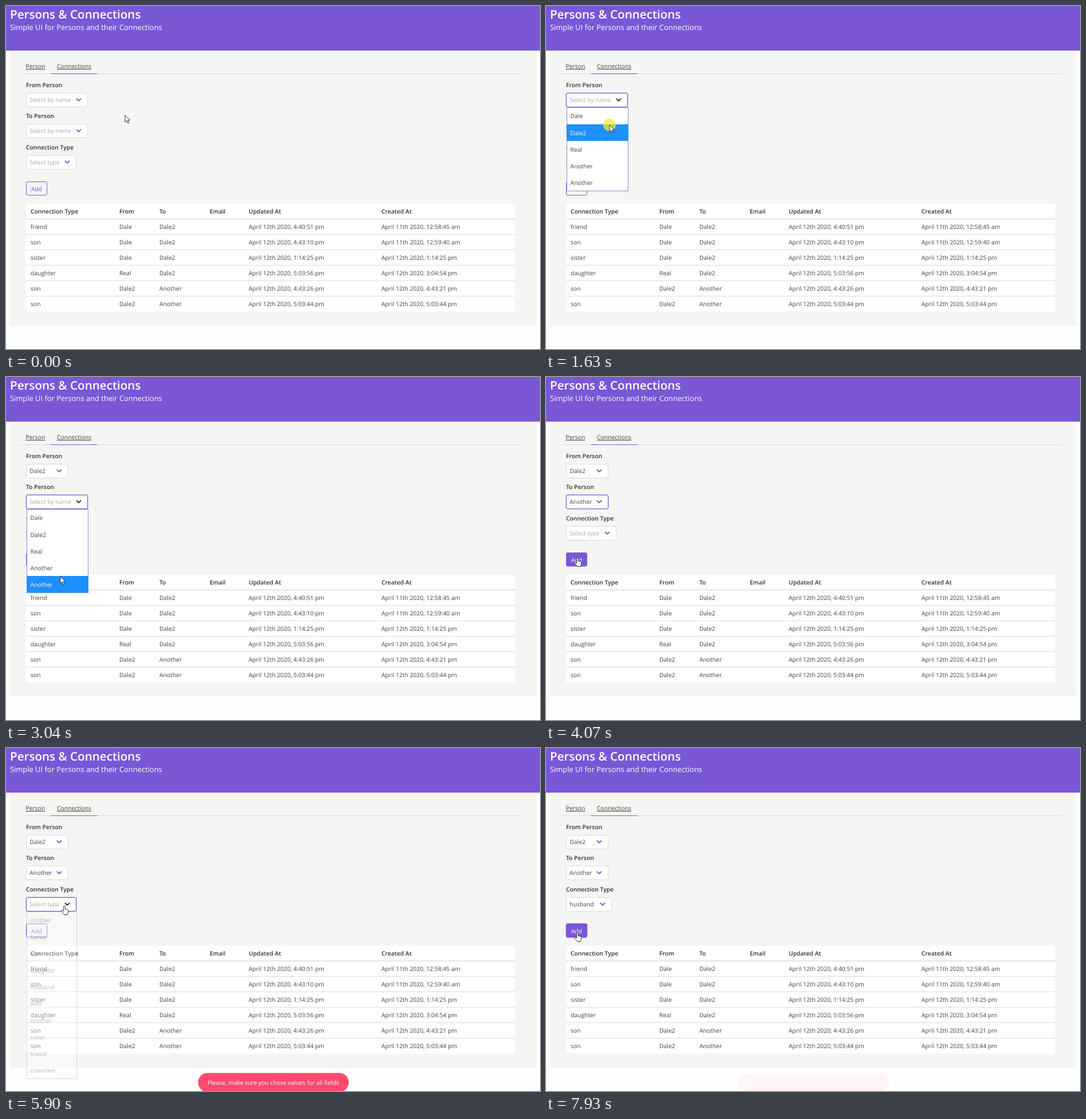
These frames come from a looping animation (933x600 px, 8000 ms). An HTML page:

```html
<!DOCTYPE html>
<html lang="en">
<head>
<meta charset="utf-8">
<title>Persons &amp; Connections</title>
<style>
html, body { margin: 0; width: 100%; height: 100%; overflow: hidden; background: #fefefe; }
svg { display: block; width: 933px; height: 600px; }
text { font: 10.34px "Open Sans", "Noto Sans", sans-serif; fill: #404040; text-rendering: geometricPrecision; white-space: pre; }
.bold { font-weight: 600; fill: #303030; }
.title { font-size: 20.6px; font-weight: 600; fill: #fff; }
.subtitle { font-size: 12.92px; fill: #fff; }
.link { text-decoration: underline; }
.hint { fill: #a8a8a8; }
.light { fill: #fff; }
.accent { fill: #7957d5; }
</style>
</head>
<body>
<svg id="stage" viewBox="0 0 933 600"></svg>
<script>
const LOOP = 8000, START = 400, STEP = 203;
const PURPLE = '#7957d5', ROW = 29.2;
const PEOPLE = ['Dale', 'Dale2', 'Real', 'Another', 'Another'];
const TYPES = ['mother', 'father', 'son', 'daughter', 'husband', 'wife', 'brother', 'sister', 'friend', 'coworker'];
const COLUMNS = [43, 198, 268, 356, 424, 656];
const HEADINGS = ['Connection Type', 'From', 'To', 'Email', 'Updated At', 'Created At'];
const ROWS = [
  ['friend', 'Dale', 'Dale2', '', '12th 2020, 4:40:51', '11th 2020, 12:58:45 am'],
  ['son', 'Dale', 'Dale2', '', '12th 2020, 4:43:10', '11th 2020, 12:59:40 am'],
  ['sister', 'Dale', 'Dale2', '', '12th 2020, 1:14:25', '12th 2020, 1:14:25 pm'],
  ['daughter', 'Real', 'Dale2', '', '12th 2020, 5:03:56', '12th 2020, 3:04:54 pm'],
  ['son', 'Dale2', 'Another', '', '12th 2020, 4:43:26', '12th 2020, 4:43:21 pm'],
  ['son', 'Dale2', 'Another', '', '12th 2020, 5:03:44', '12th 2020, 5:03:44 pm']
].map(r => [...r.slice(0, 4), `April ${r[4]} pm`, `April ${r[5]}`]);

// Inclusive step ranges for each select; picked is the step its value appears.
const SELECTS = [
  { y: 152, label: 'From Person', hint: 'Select by name', wide: 108, narrow: 74, options: PEOPLE, choice: 1,
    hover: [2, 7], focus: [3, 8], open: [4, 6], picked: 8 },
  { y: 206, label: 'To Person', hint: 'Select by name', wide: 108, narrow: 74, options: PEOPLE, choice: 4,
    hover: [8, 15], focus: [9, 20], open: [10, 14], picked: 16 },
  { y: 261, label: 'Connection Type', hint: 'Select type', wide: 88, narrow: 80, options: TYPES, choice: 4,
    hover: [25, 32], focus: [26, 35], open: [27, 31], picked: 33 }
];

// Pointer path: step, x, y
const PATH = [
  [-1, 208, 191], [0, 188, 186], [2, 114, 165], [4, 112, 165], [6, 111, 208], [7, 111, 212],
  [9, 93, 217], [10, 93, 218], [13, 95, 349], [14, 95, 350], [17, 56, 321], [18, 55, 316],
  [22, 55, 316], [25, 101, 276], [27, 102, 276], [28, 101, 300], [31, 88, 411], [32, 87, 412],
  [33, 84, 404], [35, 56, 326], [36, 55, 323], [38, 55, 323]
];
const HAND = [[2, 4], [8, 10], [17, 22], [25, 27], [35, 38]];
const CLICKS = [3, 6, 9, 14, 21, 26, 31, 36];

const within = (k, [a, b]) => k >= a && k <= b;
const text = (x, y, s, cls = '') => `<text x="${x}" y="${y}" class="${cls}">${s}</text>`;
const rect = (x, y, w, h, fill, extra = '') =>
  `<rect x="${x}" y="${y}" width="${w}" height="${h}" fill="${fill}" ${extra}/>`;
const ring = (x, y, w, h) =>
  rect(x, y, w, h, 'none', `rx="3" stroke="${PURPLE}" stroke-opacity=".25" stroke-width="2.6"`);

function pointerAt(k) {
  const i = Math.max(1, PATH.findIndex(p => p[0] >= k));
  const [k0, x0, y0] = PATH[i - 1], [k1, x1, y1] = PATH[i];
  const u = (k - k0) / (k1 - k0);
  return { x: x0 + (x1 - x0) * u, y: y0 + (y1 - y0) * u };
}

function page() {
  return rect(0, 0, 933, 600, '#fefefe') + rect(7, 78, 920, 481, '#f5f5f4') + rect(0, 0, 933, 78, PURPLE) +
    text(7, 22, 'Persons &amp; Connections', 'title') +
    text(7, 42, 'Simple UI for Persons and their Connections', 'subtitle') +
    rect(24, 118, 876, 1, '#dbdbdb') + rect(78, 118, 82, 1, PURPLE) +
    text(34.5, 109, 'Person', 'link') + text(89, 109, 'Connections', 'link');
}

function table() {
  let s = rect(35, 346, 854.5, 188.5, '#fff', 'rx="2"') + rect(35, 372, 854.5, 1, '#cfcfcf');
  HEADINGS.forEach((h, i) => s += text(COLUMNS[i], 362.5, h, 'bold'));
  ROWS.forEach((row, r) => {
    if (r) s += rect(35, 372 + 27 * r, 854.5, 1, '#dbdbdb');
    row.forEach((cell, i) => s += text(COLUMNS[i], 390 + 27 * r, cell));
  });
  return s;
}

function select(d, k) {
  const picked = k >= d.picked, focus = within(k, d.focus), hover = within(k, d.hover);
  const w = picked ? d.narrow : d.wide;
  const border = focus ? PURPLE : hover ? '#b5b5b5' : '#dbdbdb';
  return text(35, d.y - 10, d.label, 'bold') +
    (focus ? ring(35.2, d.y + .2, w - .4, 24.6) : '') +
    rect(35.5, d.y + .5, w - 1, 24, '#fff', `rx="2.5" stroke="${border}"`) +
    text(41.3, d.y + 16, picked ? d.options[d.choice] : d.hint, picked ? '' : 'hint') +
    `<path d="M-3.6 -1.9L0 1.7L3.6 -1.9" transform="translate(${19 + w} ${d.y + 12.2})"
      fill="none" stroke="${hover ? '#2b2b2b' : PURPLE}" stroke-width="1.9" stroke-linecap="round" stroke-linejoin="round"/>`;
}

function menu(d, k, pointer) {
  if (!within(k, d.open)) return '';
  const fading = k === d.open[0], w = d.wide;
  const rowY = i => Math.round(d.y + 25.3 + ROW * i);
  const top = rowY(0), h = rowY(d.options.length) - top;
  const active = fading ? -1 : Math.max(0, Math.floor((pointer.y - top) / ROW));
  const rows = d.options.map((o, i) =>
    (i === active ? rect(36, rowY(i), w, rowY(i + 1) - rowY(i), '#1e90ff') : '') +
    text(42.6, rowY(i) + 19, o, i === active ? 'light' : '')).join('');
  return `<g opacity="${fading ? .36 : 1}">` + rect(36, top, w, h, '#fff') +
    rect(36.5, top + .5, w - 1, h, 'none', 'stroke="#7f98d6"') + rows + '</g>';
}

function addButton(k) {
  const hover = within(k, [17, 22]) || k >= 35, focus = within(k, [21, 25]) || k >= 36;
  return (focus ? ring(35.2, 307.2, 36.6, 24.1) : '') +
    rect(35.5, 307.5, 36, 23.5, hover ? PURPLE : 'none', `rx="2.5" stroke="${PURPLE}"`) +
    text(43.8, 324, 'Add', hover ? 'light' : 'accent');
}

function toast(k) {
  if (k < 22) return '';
  const opacity = k === 22 ? .6 : k >= 37 ? .05 : 1;
  return `<g opacity="${opacity}">` + rect(335.6, 568.5, 263.3, 33, '#ff4a6d', 'rx="16.5"') +
    text(352, 589, 'Please, make sure you chose values for all fields', 'light') + '</g>';
}

function cursor(k, { x, y }) {
  const hand = HAND.some(r => within(k, r));
  const shape = hand
    ? 'M-1.4 9.5V1.3a1.4 1.4 0 0 1 2.8 0V6c.7-.8 1.7-.5 1.9.4.7-.5 1.6-.2 1.8.6.8-.3 1.5.2 1.5 1.1V11c0 2-1.1 3-1.1 4.6H-.4c-.6-2-2.6-3.2-4.4-5.8-.9-1.4.7-2.5 1.9-1.4z'
    : 'M0 0V12.2L2.8 9.6 4.7 14 6.7 13.1 4.8 8.9H8.6Z';
  const dot = CLICKS.includes(k) ? '<circle r="11" fill="#f7e736" fill-opacity=".75"/>' : '';
  return `<g transform="translate(${x} ${y})">${dot}<path d="${shape}" fill="#fff" stroke="#25252b" stroke-width=".95" stroke-linejoin="round"/></g>`;
}

const stage = document.getElementById('stage');
let shown = null;

function draw(k) {
  const pointer = pointerAt(k);
  stage.innerHTML = page() + SELECTS.map(d => select(d, k)).join('') + addButton(k) + table() +
    SELECTS.map(d => menu(d, k, pointer)).join('') + toast(k) + cursor(k, pointer);
}

function tick() {
  const t = performance.now() % LOOP;
  const k = Math.max(-1, Math.floor((t - START) / STEP));
  if (k !== shown) draw(shown = k);
  requestAnimationFrame(tick);
}
tick();
</script>
</body>
</html>
```
